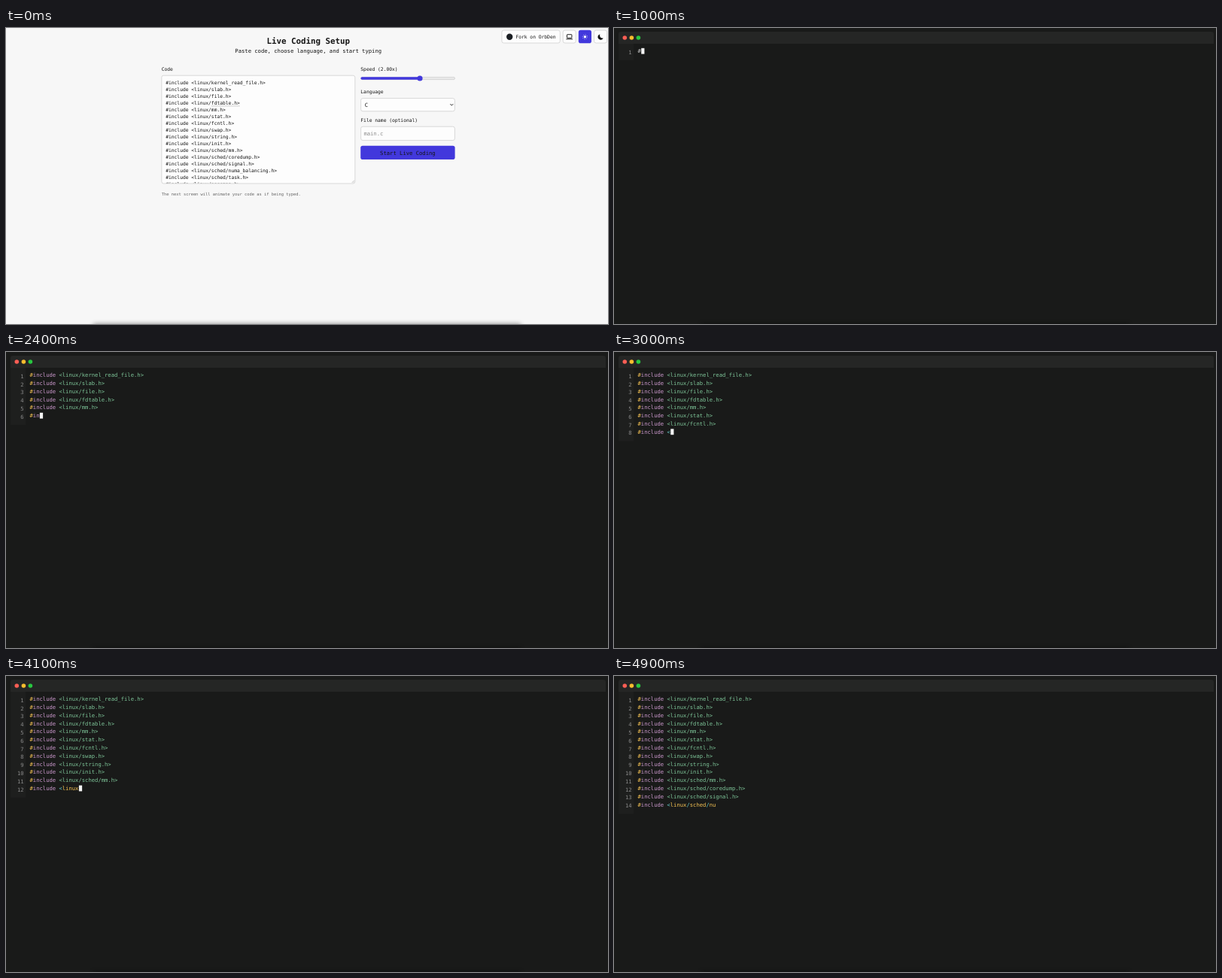
Write an HTML page that moves like this. It is 800x394 px and loops after 5000 ms.

```html
<!DOCTYPE html>
<html lang="en">
<head>
<meta charset="utf-8">
<title>Live Coding Setup</title>
<style>
  html, body { margin: 0; width: 100%; height: 100%; overflow: hidden; background: #f7f7f7; }
  svg { display: block; width: 800px; height: 394px; }
  text {
    font-family: "DejaVu Sans Mono", monospace;
    font-size: 7.2px;
    white-space: pre;
    text-rendering: geometricPrecision;
    fill: #151515;
  }
  .small { font-size: 6.3px; }
  .hint { font-size: 5.4px; fill: #666; }
  .title { font-size: 10.8px; font-weight: 700; }
  .mid { text-anchor: middle; }
  .faded { fill: #8c8c8c; }
  .box { fill: #fdfdfd; stroke: #d0d0d0; stroke-width: .8; }
  .accent { fill: #4238dc; }
  .line { fill: none; stroke: #222; stroke-width: 1; }
  #code text { fill: #ccc; }
  #code .hash { fill: #f8c555; }
  #code .word { fill: #cc99cd; }
  #code .str { fill: #7ec699; }
  #code .op { fill: #67cdcc; }
  #nums text { fill: #8a8a8a; text-anchor: end; }
</style>
</head>
<body>
<svg viewBox="0 0 800 394">
  <defs>
    <clipPath id="area"><rect x="207" y="63.5" width="256.5" height="143"/></clipPath>
    <filter id="blur" x="-5%" y="-300%" width="110%" height="700%"><feGaussianBlur stdDeviation="3.2"/></filter>
  </defs>

  <g id="setup">
    <rect width="800" height="394" fill="#f7f7f7"/>
    <text class="title mid" x="401.7" y="21.3">Live Coding Setup</text>
    <text class="mid" x="401.7" y="32.8">Paste code, choose language, and start typing</text>

    <rect class="box" x="658.9" y="3" width="77.4" height="17" rx="2.6"/>
    <circle cx="669.2" cy="11.7" r="4.2" fill="#1b1f23"/>
    <text class="small" x="677.4" y="14">Fork on OrbDen</text>

    <rect class="box" x="740.2" y="3" width="17" height="17" rx="2.6"/>
    <rect class="line" x="745.5" y="8.7" width="6.4" height="4.6" rx=".4"/>
    <path class="line" d="M744.4 14.8h8.6"/>

    <rect class="accent" x="760.8" y="2.8" width="17.2" height="17.4" rx="2.8"/>
    <circle cx="769.4" cy="11.8" r="1.7" fill="#fff"/>
    <circle cx="769.4" cy="11.8" r="3.1" fill="none" stroke="#fff" stroke-width=".9" stroke-dasharray=".7 1.735"/>

    <rect class="box" x="781.6" y="3" width="17" height="17" rx="2.6"/>
    <path d="M789.3 8.2a3.8 3.8 0 1 0 4.4 5.2a3.7 3.7 0 0 1-4.4-5.2z" fill="#111"/>

    <text class="small" x="206.7" y="56.8">Code</text>
    <rect class="box" x="206.8" y="63.2" width="257" height="143.8" rx="2.6"/>
    <g id="paste" clip-path="url(#area)"></g>
    <path d="M273.3 103.9h38" stroke="#777" stroke-width=".7" stroke-dasharray="1 1"/>
    <path d="M459.8 205.8l3-3M461.6 205.8l1.2-1.2" stroke="#888" stroke-width=".5"/>
    <text class="hint" x="206.7" y="222.5">The next screen will animate your code as if being typed.</text>

    <text class="small" x="471.3" y="56.8">Speed (2.00x)</text>
    <rect x="471.7" y="65.4" width="124.8" height="3.2" rx="1.6" fill="#e9e9e9" stroke="#bbb" stroke-width=".5"/>
    <rect class="accent" x="471.4" y="65.2" width="78" height="3.6" rx="1.8"/>
    <circle class="accent" cx="550" cy="67" r="3.6"/>

    <text class="small" x="471.3" y="87.3">Language</text>
    <rect class="box" x="471.6" y="93.6" width="124.8" height="17.2" rx="2.6"/>
    <text x="476.8" y="104.8">C</text>
    <path class="line" d="M590.4 101.2l1.9 1.9l1.9-1.9" stroke-width=".9"/>

    <text class="small" x="471.3" y="124.8">File name (optional)</text>
    <rect class="box" x="471.6" y="131.2" width="124.8" height="18.4" rx="2.6"/>
    <text class="faded" x="475.4" y="143">main.c</text>

    <rect id="start" x="471.2" y="156.8" width="125.4" height="18.2" rx="2.8"/>
    <text class="mid" x="533.9" y="168.6">Start Live Coding</text>
  </g>

  <g id="editor">
    <rect width="800" height="394" fill="#191a19"/>
    <path d="M6 21v-13a3 3 0 0 1 3-3h785a3 3 0 0 1 3 3v13z" fill="#252625"/>
    <circle cx="14.3" cy="13" r="2.8" fill="#fa5e55"/>
    <circle cx="23.4" cy="13" r="2.8" fill="#fbbd2e"/>
    <circle cx="32.4" cy="13" r="2.8" fill="#28c840"/>
    <rect id="gutter" x="6" y="21" width="20.3" fill="#1e1f1e"/>
    <g id="nums"></g>
    <g id="code"></g>
    <rect id="caret" width="4.2" height="7.8" fill="#f4f4f4"/>
  </g>

  <rect x="116" y="394" width="568" height="10" fill="#000" opacity=".45" filter="url(#blur)"/>
</svg>

<script>
const LOOP = 5000, TICK = 100, CUT = 1000;
const CHAR = 4.335, LEAD = 10.8, LEFT = 31.5, BASE = 33.2;
const headers = ["kernel_read_file", "slab", "file", "fdtable", "mm", "stat", "fcntl", "swap",
  "string", "init", "sched/mm", "sched/coredump", "sched/signal", "sched/numa_balancing",
  "sched/task", "pagemap"];
const lines = headers.map(h => `#include <linux/${h}.h>`);
const source = lines.join("\n");
// [time, characters typed]
const pace = [[1000, 1], [1800, 79], [3000, 192], [4100, 299], [4900, 374]];

const $ = id => document.getElementById(id);

function add(parent, tag, attrs, content = "") {
  const el = document.createElementNS("http://www.w3.org/2000/svg", tag);
  for (const k in attrs) el.setAttribute(k, attrs[k]);
  el.textContent = content;
  parent.append(el);
  return el;
}

function typedAt(t) {
  let i = 1;
  while (i < pace.length - 1 && t > pace[i][0]) i++;
  const [t0, n0] = pace[i - 1], [t1, n1] = pace[i];
  return Math.round(n0 + (n1 - n0) * (t - t0) / (t1 - t0));
}

// Returns [class, text] pairs; an unfinished path is read as an expression.
function tokens(line) {
  if (line.length < 2) return [["", line]];
  const [, word, rest] = line.match(/^#([a-z]*)(.*)$/);
  const out = [["hash", "#"], ["word", word]];
  if (rest.endsWith(">")) return [...out, ["str", rest]];
  for (const part of rest.match(/[<\/]|\.|[^<\/.]+/g) || [])
    out.push([/[<\/]/.test(part) ? "op" : part === "." ? "" : "hash", part]);
  return out;
}

function drawEditor(t) {
  const rows = source.slice(0, typedAt(t)).split("\n");
  const last = rows.length - 1;
  $("nums").replaceChildren();
  $("code").replaceChildren();
  rows.forEach((row, i) => {
    const y = BASE + LEAD * i;
    add($("nums"), "text", { x: 23.6, y: y + 1.5 }, i + 1);
    const text = add($("code"), "text", { x: LEFT, y });
    for (const [cls, part] of tokens(row)) add(text, "tspan", { class: cls }, part);
  });
  $("gutter").setAttribute("height", 11.2 + LEAD * rows.length);
  const caret = $("caret");
  caret.setAttribute("x", LEFT + CHAR * rows[last].length + .4);
  caret.setAttribute("y", 26.8 + LEAD * last);
  caret.style.display = t % 1000 < 500 ? "" : "none";
}

function drawSetup(t) {
  const k = Math.min(1, t / 300), ease = k * (2 - k);
  const mix = (a, b) => Math.round(a + (b - a) * ease);
  $("start").setAttribute("fill", `rgb(${mix(66, 86)},${mix(56, 84)},${mix(220, 230)})`);
}

lines.forEach((line, i) =>
  add($("paste"), "text", { class: "small", x: 212.2, y: 75.2 + 9 * i }, line));

const begin = performance.now();
let shown = -1;

function frame() {
  const t = Math.floor(Math.max(0, performance.now() - begin) % LOOP / TICK) * TICK;
  if (t !== shown) {
    shown = t;
    const typing = t >= CUT;
    $("setup").style.display = typing ? "none" : "";
    $("editor").style.display = typing ? "" : "none";
    (typing ? drawEditor : drawSetup)(t);
  }
  requestAnimationFrame(frame);
}
frame();
</script>
</body>
</html>
```
